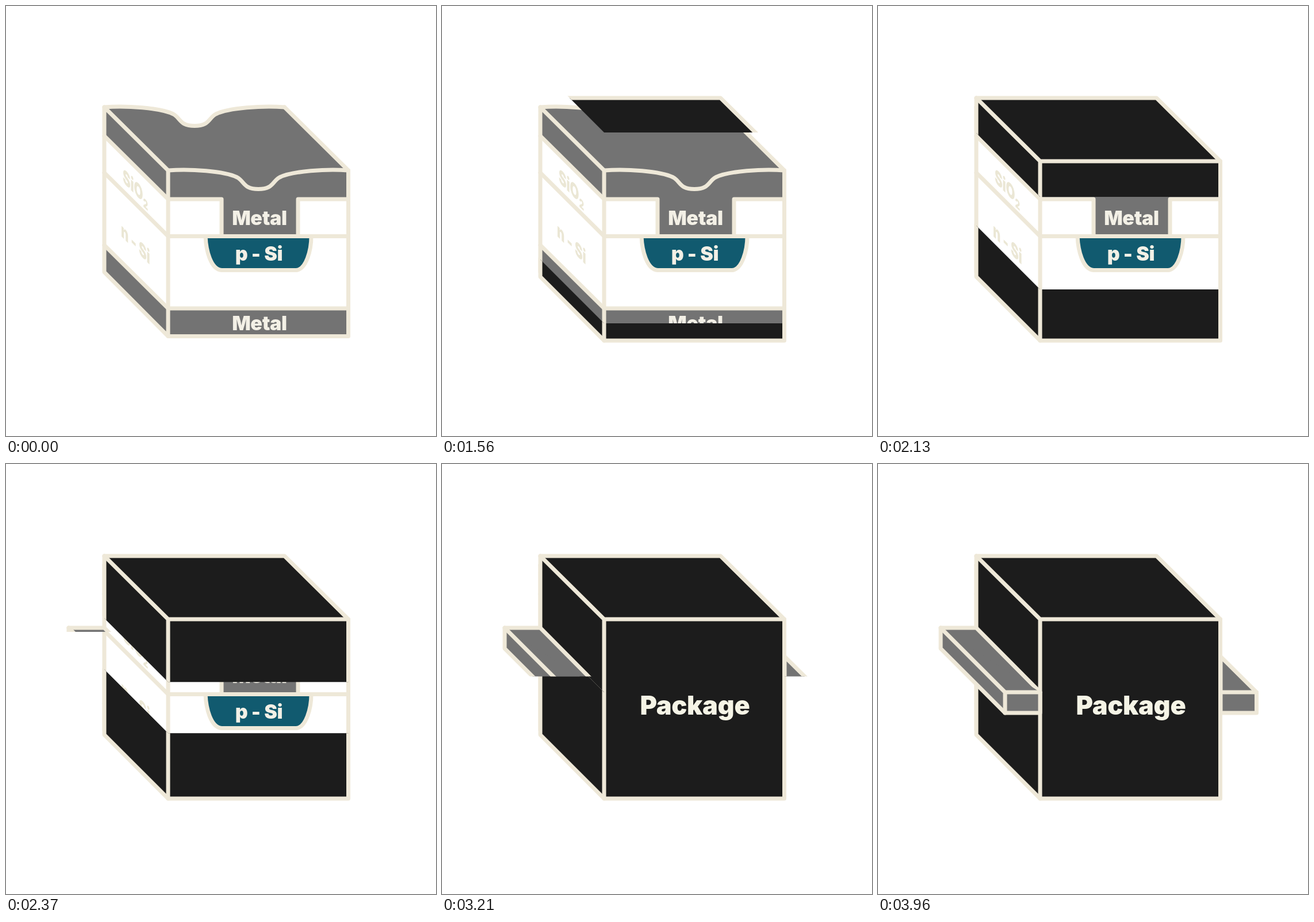
Write an HTML page that moves like this. It is 748 px wide and 748 px high and loops after 8.61 s.

```html
<!DOCTYPE html>
<html lang="en">
<head>
<meta charset="utf-8">
<title>Chip package</title>
<style>
  html, body { margin: 0; width: 100%; height: 100%; overflow: hidden; background: #fff; }
  svg { display: block; width: 100%; height: 100%; }
  .outline { stroke: #eee8d8; stroke-width: 7; stroke-linejoin: round; stroke-linecap: round; fill: none; }
  .metal { fill: #737373; }
  .well { fill: #115a6f; }
  .case { fill: #1c1c1c; }
  .paper { fill: #fff; }
  text { font: 900 34px Inter, "Open Sans", sans-serif; fill: #f3f0e6; }
  .front { text-anchor: middle; letter-spacing: -.3px; }
  .side { fill: #ebe7d5; }
  .title { font-size: 45px; fill: #f5f4e6; }

  /* The loop is 287 ticks of 30 ms; each wipe advances once per tick. */
  .wipe { animation: 8610ms infinite; }
  .lid { animation-name: lid; }
  .base { animation-name: base; }
  .pins { animation-name: pins; }
  @keyframes lid {
    0% { transform: translateY(-400px); animation-timing-function: step-end; }
    14.634% { transform: translateY(-236px); animation-timing-function: steps(40, end); }
    28.571%, 100% { transform: translateY(0); }
  }
  @keyframes base {
    0% { transform: translateY(400px); animation-timing-function: step-end; }
    14.634% { transform: translateY(186px); animation-timing-function: steps(60, end); }
    35.54%, 100% { transform: translateY(0); }
  }
  @keyframes pins {
    0% { transform: translateY(-500px); animation-timing-function: step-end; }
    26.132% { transform: translateY(-157.5px); animation-timing-function: steps(57, end); }
    45.993%, 100% { transform: translateY(0); }
  }
</style>
</head>
<body>
<svg viewBox="0 0 748 748">
  <defs>
    <clipPath id="lidClip">
      <polygon class="wipe lid" points="0,-500 748,-500 748,397 282,397 0,115"/>
    </clipPath>
    <clipPath id="baseClip">
      <polygon class="wipe base" points="0,115 282,397 748,397 748,1200 0,1200"/>
    </clipPath>
    <clipPath id="baseLimit">
      <polygon points="0,355 282,355 282,300 748,300 748,748 0,748"/>
    </clipPath>
    <clipPath id="pinClip">
      <rect class="wipe pins" y="-500" width="748" height="938.5"/>
    </clipPath>

    <path id="wave" d="M282 286C320 283 380 287 402 298C415 305 413 318.500 439 318.500C465 318.500 463 305 476 298C498 287 558 283 595.500 286"/>

    <g id="package">
      <path class="case outline" style="fill:#1c1c1c" d="M171 160H484.500L595.500 270V582H282L171 471Z"/>
      <path class="outline" d="M171 160L282 270H595.500M282 270V582"/>
      <text class="front title" x="440" y="436">Package</text>
    </g>
  </defs>

  <g id="chip">
    <path class="paper" d="M171 176L282 286H595.500V574.500H282L171 463Z"/>
    <path class="metal" d="M171 176C209 173 269 177 291 188C304 195 302 208.500 328 208.500C354 208.500 352 195 365 188C387 177 447 173 484.500 176L595.500 286C558 283 498 287 476 298C463 305 465 318.500 439 318.500C413 318.500 415 305 402 298C380 287 320 283 282 286Z"/>
    <path class="metal" d="M282 286C320 283 380 287 402 298C415 305 413 318.500 439 318.500C465 318.500 463 305 476 298C498 287 558 283 595.500 286V336H508V400.500H375V336H282Z"/>
    <path class="metal" d="M171 176L282 286V336L171 226ZM171 416L282 526H595.500V574.500H282L171 463Z"/>
    <path class="outline" style="fill:#115a6f" d="M347 400.500C348 425 356 458 375 459.500H505C522 458 531 425 531 400.500"/>
    <g class="outline">
      <use href="#wave"/>
      <use href="#wave" x="-111" y="-110"/>
      <path d="M171 176V463L282 574.500H595.500V286L484.500 176M171 176L282 286V574.500"/>
      <path d="M171 226L282 336H375V400.500M508 400.500V336H595.500"/>
      <path d="M171 290L282 400.500H595.500M171 416L282 526H595.500"/>
    </g>
    <text class="front" x="441" y="381">Metal</text>
    <text class="front" x="440" y="443">p - Si</text>
    <text class="front" x="441" y="564">Metal</text>
    <text class="side" transform="matrix(.6 .6 0 1 203 306)">SiO<tspan font-size="22" dy="7" style="font-size:22px">2</tspan></text>
    <text class="side" transform="matrix(.6 .6 0 1 200 400)">n - Si</text>
  </g>

  <use href="#package" clip-path="url(#lidClip)"/>
  <g clip-path="url(#baseLimit)">
    <use href="#package" clip-path="url(#baseClip)"/>
  </g>

  <g clip-path="url(#pinClip)">
    <g class="outline" style="fill:#737373">
      <path d="M109 285H171L282 397V433H221L109 321Z"/>
      <path d="M109 285L221 397H282M221 397V433"/>
      <path d="M596 335L658.500 397V433H596Z"/>
      <path d="M596 397H658.500"/>
    </g>
  </g>
</svg>
</body>
</html>
```
